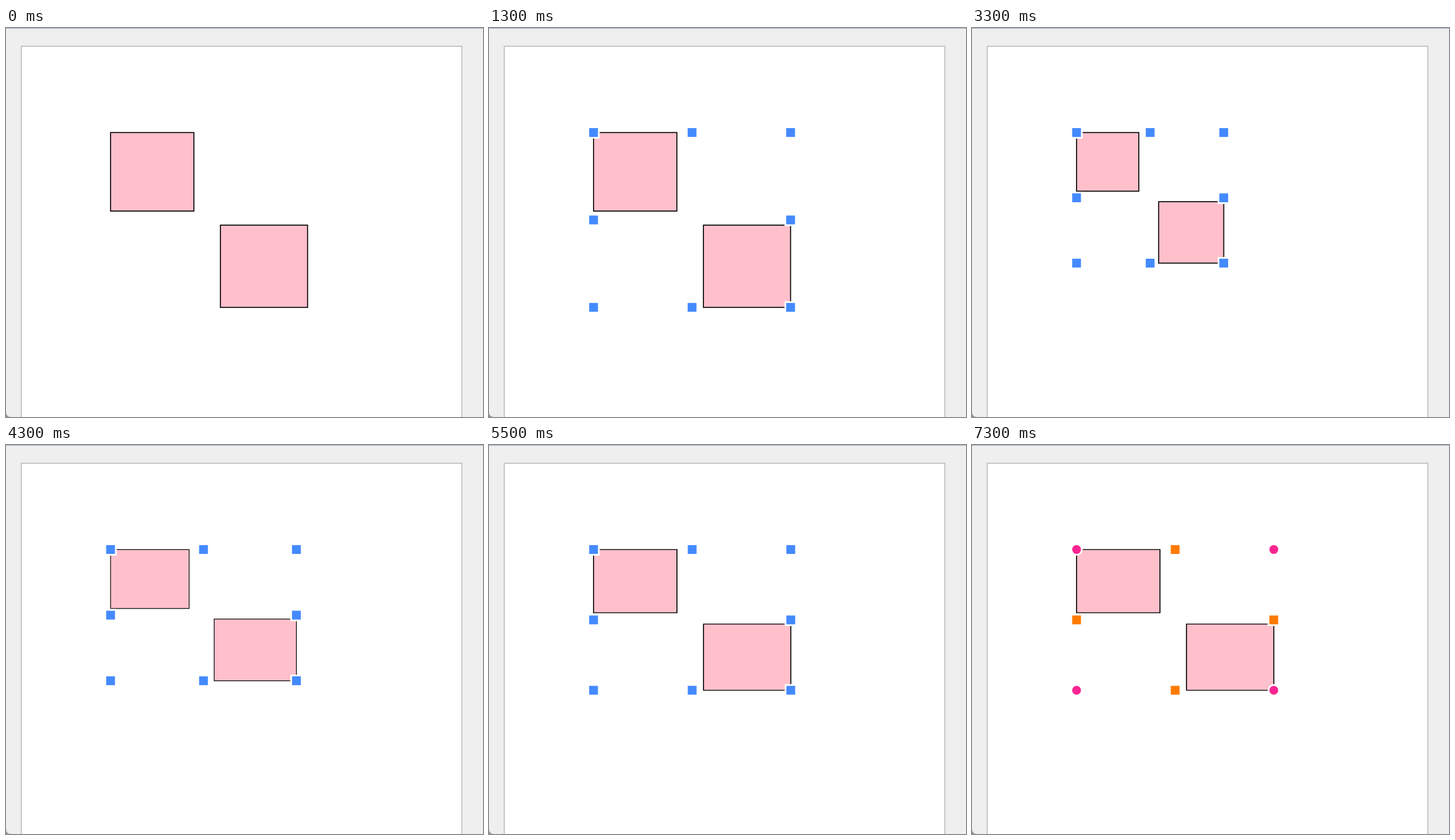
These frames come from a looping animation (812 by 661 pixels, 8 s). An HTML page with a canvas:

```html
<!DOCTYPE html>
<html>
<head>
<meta charset="utf-8">
<style>
  html, body { margin: 0; width: 100%; height: 100%; overflow: hidden; background: #efefef; }
  canvas { display: block; }
</style>
</head>
<body>
<canvas id="stage" width="812" height="661"></canvas>
<script>
const ctx = document.getElementById('stage').getContext('2d');
const LOOP = 8000, STEP = 100;
const X = 178, Y = 177.6, W = 335.4, H = 297.1, STROKE = 1.7;

// Offsets and sizes inside the unscaled group
const shapes = [
  { x: 0, y: 0, w: 141.8, h: 133.5 },
  { x: 187, y: 157.4, w: W - 187, h: H - 157.4 }
];

// Turning points of the two resize drags: time, horizontal and vertical scale
const turns = [
  [2600, 1, 1], [2700, 1.014, 1.014], [3000, 1.237, 1.237], [3300, .747, .747], [3400, .731, .731],
  [4200, .731, .731], [4500, 1.368, .79], [4700, 1.33, .8], [4900, .745, .802], [5100, 1.001, .805]
];
const commits = [0, 3700, 5500];

const easeIn = n => p => p ** n;
const easeOut = n => p => 1 - (1 - p) ** n;
const marquees = [
  { from: [643.3, 149.5], to: [94, 565.3], start: 600, steps: 6, end: 1300, ease: [easeOut(1.74), easeOut(2.44)] },
  { from: [587.3, 127.3], to: [74, 463.3], start: 6600, steps: 2, end: 6800, ease: [easeIn(3), easeIn(2.4)] }
];

const mix = (a, b, p) => a + (b - a) * p;
const within = (t, a, b) => t >= a && t < b;

function scaleAt(t) {
  const next = turns.findIndex(k => k[0] > t);
  if (next === 0) return [1, 1];
  if (next < 0) return turns[turns.length - 1].slice(1);
  const [t0, ...a] = turns[next - 1], [t1, ...b] = turns[next];
  return a.map((v, i) => mix(v, b[i], (t - t0) / (t1 - t0)));
}

function fill(color, x, y, w, h) {
  ctx.fillStyle = color;
  ctx.fillRect(x, y, w, h);
}

function outline(color, width, x, y, w, h) {
  ctx.strokeStyle = color;
  ctx.lineWidth = width;
  ctx.strokeRect(x, y, w, h);
}

function drawPage() {
  fill('#efefef', 0, 0, 812, 661);
  fill('#8fa6ba', 0, 0, 812, 1);
  fill('#fff', 26, 31, 750, 640);
  outline('#c6c6c6', 2, 26, 31, 750, 640);
  ctx.fillStyle = '#929292';
  ctx.beginPath();
  ctx.moveTo(0, 652);
  ctx.quadraticCurveTo(0, 661, 9, 661);
  ctx.lineTo(0, 661);
  ctx.fill();
}

const place = (s, sx, sy) => [X + s.x * sx, Y + s.y * sy, s.w * sx, s.h * sy];

// The border takes on the scale of the last finished resize
function drawShape([x, y, w, h], t) {
  const [bx, by] = scaleAt(commits.filter(c => c <= t).pop()).map(s => s * STROKE);
  fill('#000', x - bx / 2, y - by / 2, w + bx, h + by);
  fill('#ffc0cb', x + bx / 2, y + by / 2, w - bx, h - by);
}

function drawHandle(x, y, color, round) {
  for (const [c, r] of [['#fff', 10.4], [color, 7.5]]) {
    ctx.fillStyle = c;
    ctx.beginPath();
    if (round) ctx.arc(x, y, r, 0, 7);
    else ctx.rect(x - r, y - r, 2 * r, 2 * r);
    ctx.fill();
  }
}

function drawHandles(w, h, rotating) {
  for (let i = 0; i < 9; i++) {
    if (i === 4) continue;
    const corner = i % 2 === 0;
    const color = !rotating ? '#448aff' : corner ? '#fb2492' : '#ff7b00';
    drawHandle(X + i % 3 * w / 2, Y + Math.floor(i / 3) * h / 2, color, rotating && corner);
  }
}

function drawMarquee({ from, to, start, steps, end, ease }, t) {
  if (!within(t, start, end)) return;
  const p = Math.min(1, ((t - start) / STEP + 1) / steps);
  const [x, y] = from.map((v, i) => mix(v, to[i], ease[i](p)));
  const box = [x, from[1], from[0] - x, y - from[1]];
  fill('rgba(2,111,215,.38)', ...box);
  outline('#2080d8', 1.6, ...box);
}

function draw(t) {
  const [sx, sy] = scaleAt(t);
  const boxes = shapes.map(s => place(s, sx, sy));
  drawPage();
  boxes.forEach(box => drawShape(box, t));
  if (within(t, 6300, 6400)) outline('#5a61af', 3, ...boxes[1]);
  if (within(t, 1300, 6100)) drawHandles(W * sx, H * sy, false);
  if (t >= 7300) drawHandles(W * sx, H * sy, true);
  marquees.forEach(m => drawMarquee(m, t));
}

function tick() {
  const t = performance.now() % LOOP;
  draw(t - t % STEP);
  requestAnimationFrame(tick);
}
tick();
</script>
</body>
</html>
```
